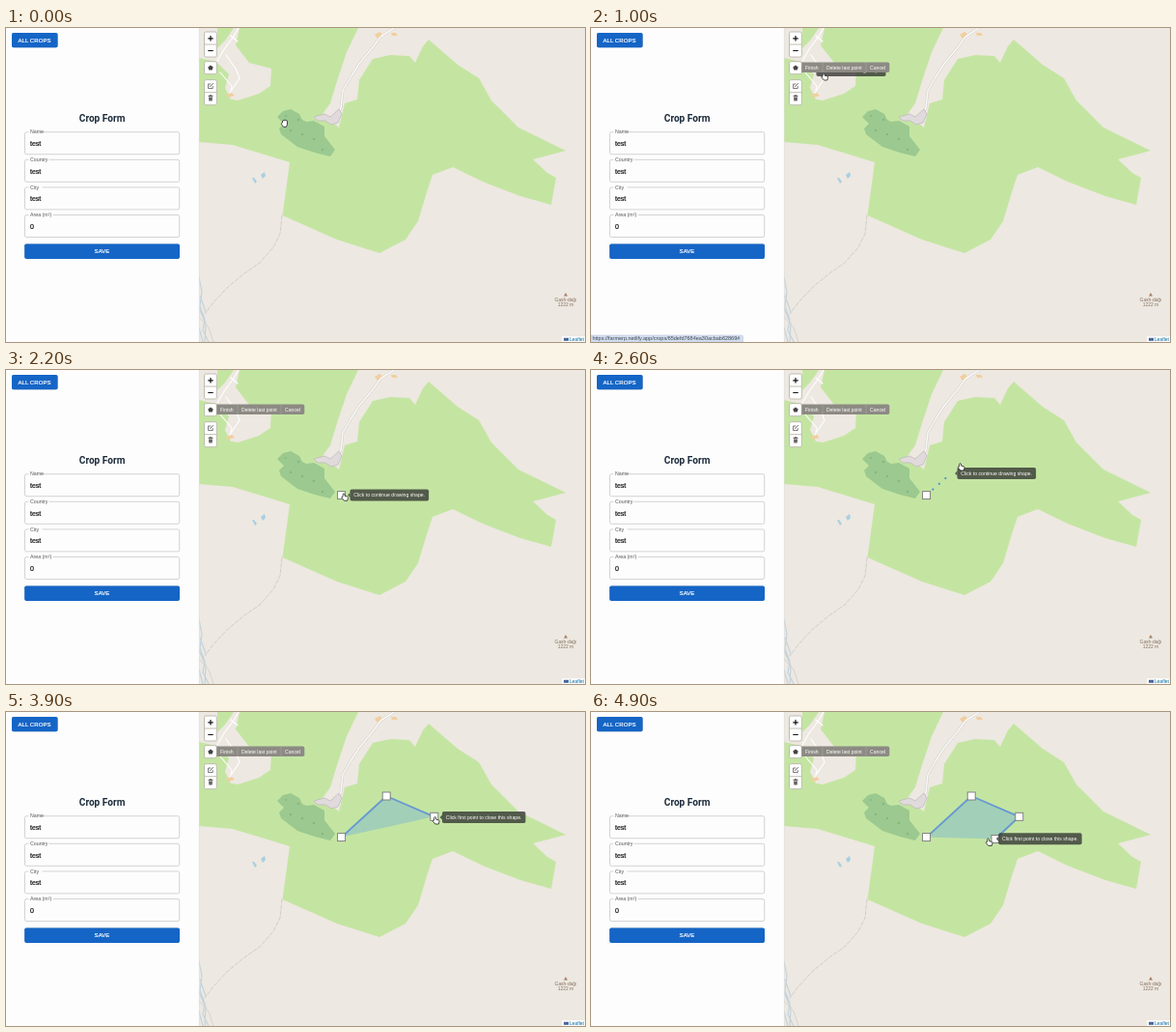
An HTML page that plays this animation: 600 px wide and 325 px high, repeating every 5 s.

```html
<!DOCTYPE html>
<html lang="en">
<head>
<meta charset="utf-8">
<title>Crop Form</title>
<style>
  html, body { margin: 0; width: 100%; height: 100%; overflow: hidden; background: #fdfdfd; }
  svg { display: block; width: 600px; height: 325px; font-family: "Liberation Sans", Arial, sans-serif; }
  .ctl { fill: #fff; stroke: #b9b7aa; stroke-width: .9; }
  .tip { font-size: 5.14px; fill: #fff; }
  .btn { fill: #1565c6; filter: drop-shadow(0 .5px .4px #0004); }
  .cap { font-size: 6px; letter-spacing: .08px; fill: #fff; stroke: #fff; stroke-width: .2; }
  .line { fill: none; stroke-linejoin: round; stroke-linecap: round; }
</style>
</head>
<body>
<svg viewBox="0 0 600 325">
  <!-- map -->
  <rect x="200" width="400" height="325" fill="#ede8e1"/>
  <path fill="#c4e5a2" d="M242 0H365L353 25 343 55 336 78 328 89 345 103 351 78 364 74 366 54 380 32 398 28 418 29 424 36 432 19 438 12 468 38 490 52 503 75 531 103 580 127 546 136 561 150 570 155 565 183 533 174 494 159 463 144 442 152 436 170 427 200 414 219 387 233 343 219 286.5 194 294 139 235 121 200 118V52L222 72 240 75 262 68 274 60 275 42 252 36 238 18Z"/>
  <path fill="#c4e5a2" d="M219 0H236L227 13 219 21ZM200 31L218 35 231 48 227 62 234 76 200 80Z"/>
  <g class="line" stroke="#fff" stroke-width="1.1">
    <path d="M241 0L235 10 226 22 219 34M228 28L238 42 242 52 234 64M222 46L234 60 232 70M233 8L240 14"/>
  </g>
  <g class="line">
    <path stroke="#cfcac5" stroke-width="2.4" d="M402 0L388 9 381 19 366 37 357 51 349 65 347 83 340 94"/>
    <path stroke="#fbfafa" stroke-width="1.5" d="M402 0L388 9 381 19 366 37 357 51 349 65 347 83 340 94"/>
    <path stroke="#c6c0bc" stroke-width=".7" stroke-dasharray="4 2" d="M286 194L284 213 277 227 263 243 247 254 230 268 215 284 206 296"/>
    <path stroke="#c3d3dd" stroke-width="1.2" d="M200 258L203 273 201 288 206 302 204 313 210 325M201 277L207 294M200 290L207 306 206 325M200 310L204 325"/>
    <path stroke="#d8d3ce" stroke-width="1" d="M200 299L210 310 215 325"/>
  </g>
  <path fill="#f1cfa0" d="M382 7L387 4 390 6 385 11ZM399 5L404 5 406 8 400 8ZM228 69L234 67 237 70 230 72Z"/>
  <path fill="#e0dadd" stroke="#bdb6bb" stroke-width=".7" d="M319 92L330 89 336 92 345 84 348 89 344 98 337 100 331 96 323 96Z"/>
  <path fill="#9bc98f" d="M281 92L287 86 295 84 304 89 307 95 311 97 319 96 330 102 330 112 341 126 336 133 320 129 302 123 285 110 283 104 288 99Z"/>
  <g fill="#86b67e">
    <circle cx="303" cy="95" r="1.2"/><circle cx="295" cy="106" r="1.2"/><circle cx="307" cy="110" r="1.2"/>
    <circle cx="319" cy="115" r="1.2"/><circle cx="328" cy="126" r="1.2"/><circle cx="290" cy="91" r="1"/>
  </g>
  <path fill="#a9cfe2" d="M255 155L257 155 260 159 258 161ZM264 152L268 149 269 153 266 156Z"/>
  <path fill="#a77f62" d="M580 274L582 277.6H578Z"/>
  <g font-size="4.9" fill="#86705f" text-anchor="middle">
    <text x="580" y="283.2">Gash-dağı</text><text x="580" y="288.2">1222 m</text>
  </g>
  <rect x="576" y="319" width="24" height="6" fill="#fffc"/>
  <rect x="578" y="320.8" width="5" height="3" fill="#44679b"/>
  <text x="584" y="324" font-size="5" fill="#0872a8">Leaflet</text>

  <!-- drawn shape -->
  <path id="area" fill="#38f" fill-opacity=".23"/>
  <path id="edge" class="line" stroke="#4a82e0" stroke-opacity=".72" stroke-width="1.9"/>
  <g id="dots" fill="#4a8bd8"></g>
  <g id="marks" fill="#fff" stroke="#777" stroke-width=".9"></g>
  <g id="tip">
    <rect id="tipBox" y="-6" height="12" rx="1.8" fill="#2d2d2d" fill-opacity=".75"/>
    <path d="M0-2.4V2.4L-2.4 0Z" fill="#2d2d2d" fill-opacity=".75"/>
    <text id="tipText" class="tip" x="3.8" y="1.8"></text>
  </g>

  <!-- map controls -->
  <g class="ctl">
    <rect x="205.5" y="4" width="12.8" height="26" rx="1.8"/><path d="M205.5 17H218.3"/>
    <rect x="205.5" y="34.7" width="12.8" height="13" rx="1.8"/>
    <rect x="205.5" y="53.7" width="12.8" height="26" rx="1.8"/><path d="M205.5 66.7H218.3"/>
  </g>
  <path d="M209.3 10.8H214.7M212 8.1V13.5M209.3 23.5H214.7" stroke="#111" stroke-width="1.2"/>
  <path fill="#444" d="M212 38.4L214.7 40.4 213.7 43.6H210.3L209.3 40.4Z"/>
  <path class="line" stroke="#555" stroke-width=".8" d="M212 58H209.6V62.6H214.2V60.5M211.4 60.8L214.6 57.4"/>
  <path fill="#666" d="M209.6 69.8H214.4V70.9H209.6ZM210 71.6H214L213.7 75.4H210.3ZM211.2 69H212.8V70H211.2Z"/>
  <g id="bar" class="tip">
    <path fill="#8d8a84" d="M218.3 35.5H307.5Q309.3 35.5 309.3 37.3V44.2Q309.3 46 307.5 46H218.3Z"/>
    <path stroke="#aaa" stroke-width=".5" d="M240 35.5V46M285 35.5V46"/>
    <text x="222" y="42.5">Finish</text><text x="244" y="42.5">Delete last point</text><text x="289" y="42.5">Cancel</text>
  </g>

  <!-- form -->
  <rect width="200" height="325" fill="#fdfdfd"/>
  <path d="M200.3 0V325" stroke="#deddda" stroke-width=".6"/>
  <rect class="btn" x="6" y="5" width="47.6" height="15.3" rx="1.8"/>
  <text class="cap" x="12.4" y="14.9">ALL CROPS</text>
  <text x="99.6" y="96.6" font-family="Roboto, sans-serif" font-size="10.1" font-weight="bold" fill="#1c2b3b" text-anchor="middle">Crop Form</text>
  <g id="fields"></g>
  <rect class="btn" x="19.2" y="223.5" width="160.8" height="15.4" rx="1.8"/>
  <text class="cap" x="99.5" y="233.4" text-anchor="middle">SAVE</text>
  <g id="status">
    <path fill="#d3dff0" stroke="#b6c3d6" stroke-width=".5" d="M0 318H156Q157.5 318 157.5 319.5V325H0Z"/>
    <text x="1.5" y="323.4" font-size="5.5" fill="#3c4550">https://farmerp.netlify.app/crops/65defd7684ea30acbab62869#</text>
  </g>

  <path id="hand" fill="#fff" stroke="#222" stroke-width=".8" stroke-linejoin="round"/>
</svg>
<script>
const $ = id => document.getElementById(id);

$('fields').innerHTML = [['Name', 'test'], ['Country', 'test'], ['City', 'test'], ['Area (m²)', '0']]
  .map(([label, value], i) => `<g transform="translate(0 ${i * 28.6})">
    <rect x="19.5" y="107.7" width="160.2" height="23" rx="1.8" fill="none" stroke="#c2c2c2" stroke-width=".7"/>
    <rect x="23.3" y="106" width="${label.length * 2.3 + 5}" height="3" fill="#fdfdfd"/>
    <text x="25" y="109.4" font-size="5.25" fill="#555">${label}</text>
    <text x="25" y="122" font-size="7" fill="#111" stroke="#111" stroke-width=".2">${value}</text></g>`).join('');

// pointer path: time, x, y
const path = [
  [0, 289, 96], [100, 289, 96], [600, 212, 40], [800, 212, 41], [1000, 242, 47],
  [1300, 345, 131.5], [1400, 346.5, 131], [1600, 347.5, 129.5], [2000, 347.5, 129.5],
  [2100, 350, 129.5], [2300, 352, 127], [2700, 394, 87], [2900, 394, 87], [3300, 425, 97],
  [3600, 444.5, 108.5], [3800, 445.5, 109], [4000, 445.5, 109], [4400, 419, 131],
  [4700, 419, 131], [4900, 412.5, 131.5]
];
// clicked corners: time, x, y
const corners = [[2000, 347.6, 129.6], [2800, 394.2, 87], [3700, 443.8, 108.3], [4500, 419, 131.5]];
const GRAB = 'M-2.6 2.2l.3-2.2q.9-.9 1.3.2q.2-1.6 1.2-.8q1.1-.6 1.3.6q1.2-.3 1.1 1l-.2 3-1.1 2.4h-2.6l-2.3-2.7q-.5-1.2 1-1.5z';
const POINT = 'M-1.7 0q.8-1.1 1.5 0l.4 2.2 2.5.6q1 .3.8 1.4l-.7 2.8h-3.5l-2.5-3.1q-.1-1.1 1.1-.7z';

function pointer(t) {
  const i = Math.max(1, path.findIndex(p => p[0] >= t));
  const [a, b] = [path[i - 1], path[i]];
  const k = Math.max(0, (t - a[0]) / (b[0] - a[0]));
  return [a[1] + (b[1] - a[1]) * k, a[2] + (b[2] - a[2]) * k];
}

const show = (id, on) => $(id).setAttribute('visibility', on ? 'visible' : 'hidden');
const set = (id, name, value) => $(id).setAttribute(name, value);

function draw(t) {
  const [hx, hy] = pointer(t);
  const [x, y] = pointer(Math.max(0, t - 100)); // the map trails the pointer
  const pts = corners.filter(c => t >= c[0]).map(c => [c[1], c[2]]);
  const d = pts.length ? 'M' + pts.join('L') : '';

  set('hand', 'd', t < 500 ? GRAB : POINT);
  set('hand', 'transform', `translate(${hx} ${hy})`);
  show('bar', t >= 800);
  show('status', t >= 700 && t < 1500);
  set('status', 'opacity', t < 1400 ? 1 : .75);

  set('edge', 'd', d);
  set('area', 'd', pts.length > 2 ? d + 'Z' : '');
  $('marks').innerHTML = pts.map(([px, py]) =>
    `<rect x="${px - 4}" y="${py - 4}" width="8" height="8"/>`).join('');

  let dots = '';
  if (pts.length) {
    const [px, py] = pts[pts.length - 1];
    const len = Math.hypot(x - px, y - py);
    for (let s = 9; s < len; s += 8.7)
      dots += `<circle cx="${px + (x - px) * s / len}" cy="${py + (y - py) * s / len}" r="1.1"/>`;
  }
  $('dots').innerHTML = dots;

  const [text, width] = t < 2100 ? ['Click to start drawing shape.', 72]
    : t < 3900 ? ['Click to continue drawing shape.', 81.6]
    : ['Click first point to close this shape.', 86.4];
  show('tip', t >= 900);
  set('tip', 'transform', `translate(${x + 6.5} ${y})`);
  set('tipBox', 'width', width);
  $('tipText').textContent = text;
}

function tick() {
  draw(Math.floor(performance.now() % 5000 / 100) * 100);
  requestAnimationFrame(tick);
}
tick();
</script>
</body>
</html>
```
